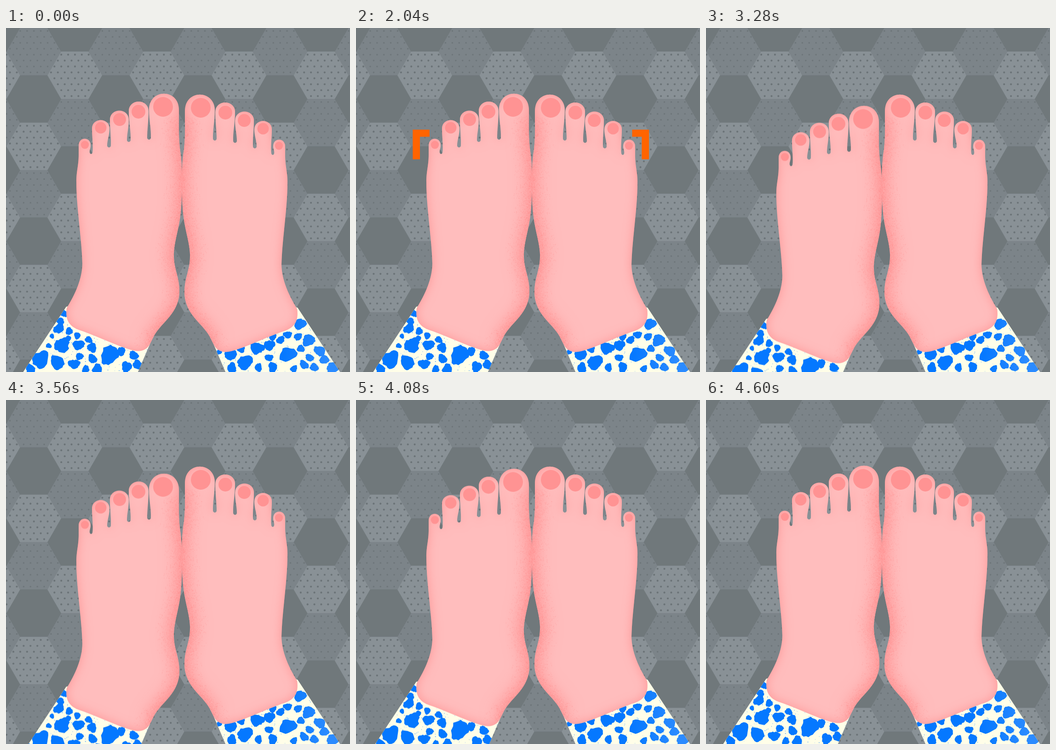
An HTML page with a canvas for the animation above (5 s loop, 748 px wide and 748 px high).

```html
<!DOCTYPE html>
<html lang="en">
<head>
<meta charset="utf-8">
<title>Tapping foot</title>
<style>
html, body { margin: 0; width: 100%; height: 100%; overflow: hidden; background: #70787b; }
canvas { display: block; width: 100vw; height: 100vh; }
</style>
</head>
<body>
<canvas id="stage" width="748" height="748"></canvas>
<script>
const SIZE = 748, LOOP = 5000, STEP = 40;
const MIRROR_X = 765, MIRROR_Y = 2;
const ctx = document.getElementById('stage').getContext('2d');

function layer(draw) {
  const canvas = document.createElement('canvas');
  canvas.width = canvas.height = SIZE;
  draw(canvas.getContext('2d'));
  return canvas;
}

function seeded(seed) {
  return () => {
    seed = (seed * 1664525 + 1013904223) >>> 0;
    return seed / 4294967296;
  };
}

function dot(c, x, y, r) {
  c.beginPath();
  c.arc(x, y, r, 0, Math.PI * 2);
  c.fill();
}

// ---- floor ----
const HEX = 59.5, HEX_H = HEX * Math.sqrt(3);
const TILES = [
  { fill: '#7c8489', dots: '#6e767a', r: 1.8 },
  { fill: '#70787b' },
  { fill: '#899196', dots: '#6b7377', r: 2.1 }
];

function hexagon(c, cx, cy, tile) {
  c.save();
  c.beginPath();
  for (let i = 0; i < 6; i++) {
    const a = i * Math.PI / 3;
    c.lineTo(cx + HEX * Math.cos(a), cy + HEX * Math.sin(a));
  }
  c.closePath();
  c.fillStyle = c.strokeStyle = tile.fill;
  c.lineWidth = 0.6;
  c.fill();
  c.stroke();
  if (tile.dots) {
    c.clip();
    c.fillStyle = tile.dots;
    const gap = HEX / 4, row = HEX_H / 8;
    for (let j = -4; j < 4; j++)
      for (let i = -5; i <= 5; i++)
        dot(c, cx + (i + (j & 1) / 2) * gap, cy + (j + 0.5) * row, tile.r);
  }
  c.restore();
}

const floor = layer(c => {
  for (let col = -1; col < 9; col++) {
    const odd = col & 1;
    for (let row = -1; row < 8; row++) {
      const y = 51.5 + (row + odd / 2) * HEX_H;
      hexagon(c, 60.7 + col * HEX * 1.5, y, TILES[(row + 3 + odd * 2) % 3]);
    }
  }
});

// ---- foot ----
const OUTER = 'M132 609C150 580 166 545 166 512C165 460 153 390 153 335C153 310 158 300 158 275L158 256';
const TOES = 'C158 236 184 236 184 255C184 262 181 266 182 271C183 275 187 275 188 271' +
  'C190 258 187 235 187 219C187 194 225 194 225 219C225 233 220 243 220 256C221 261 227 261 228 256' +
  'C229 240 226 220 226 200C226 173 267 173 267 200C267 215 263 230 263 244C264 249 270 249 271 244' +
  'C272 225 267 205 267 181C267 153 310 153 310 181C310 200 307 222 307 239C308 244 314 244 315 239' +
  'C316 222 311 200 311 178C311 131 376 131 376 178';
const INNER = 'C376 215 375 240 379 268C385 310 383 370 380 400C376 440 365 465 365 495' +
  'C365 525 377 540 377 572C377 620 338 640 322 669L313 687';
const CUFF = 'C307 699 295 704 282 702C255 698 200 670 160 657C140 650 128 637 132 609Z';
const NAILS = [[341.5, 171.5, 21.5], [288, 182, 15], [247, 199, 14], [206, 217, 12.5], [171.5, 254, 8.7]];

const footPath = new Path2D(OUTER + TOES + INNER + CUFF);

// Paints only the blurred shadow of a shape.
function glow(c, color, blur, paint) {
  c.save();
  c.shadowColor = color;
  c.shadowBlur = blur;
  c.shadowOffsetX = 2000;
  c.translate(-2000, 0);
  paint();
  c.restore();
}

function grain(c, d, count, depth, rnd) {
  const curve = document.createElementNS('http://www.w3.org/2000/svg', 'path');
  curve.setAttribute('d', d);
  const length = curve.getTotalLength();
  for (let i = 0; i < count; i++) {
    const p = curve.getPointAtLength(rnd() * length);
    c.fillStyle = rnd() < 0.7 ? 'rgba(255,130,130,.28)' : 'rgba(255,195,195,.3)';
    c.fillRect(p.x - rnd() * rnd() * depth, p.y + rnd() * 4, 1.3, 1.3);
  }
}

const foot = layer(c => {
  c.fillStyle = '#ffbdbd';
  c.fill(footPath);
  c.save();
  c.clip(footPath);
  const outside = new Path2D();
  outside.rect(-100, -100, 948, 948);
  outside.addPath(footPath);
  glow(c, 'rgba(255,138,138,.75)', 22, () => c.fill(outside, 'evenodd'));
  const side = 'M376 190' + INNER;
  const sidePath = new Path2D(side);
  glow(c, 'rgba(255,138,138,.6)', 32, () => {
    c.lineWidth = 30;
    c.stroke(sidePath);
  });
  grain(c, side, 2600, 42, seeded(7));
  c.restore();
  NAILS.forEach(([x, y, r]) => {
    c.fillStyle = '#ff9393';
    dot(c, x, y, r);
  });
});

// ---- trousers ----
const legPath = new Path2D('M131 606L36 750H286L313 687L282 650L160 600Z');

// x, y, radius
const LEFT_SPOTS = [
  126, 621, 8, 118, 637, 8, 115, 653, 12, 100, 670, 5, 137, 659, 8, 136, 675, 6,
  122, 690, 16, 93, 691, 6, 75, 721, 18, 53, 741, 10, 158, 689, 12, 155, 669, 7,
  180, 678, 8, 187, 695, 10, 111, 727, 15, 160, 714, 8, 148, 731, 12, 188, 719, 10,
  173, 742, 8, 198, 742, 11, 225, 711, 20, 251, 703, 9, 278, 712, 10, 262, 737, 11,
  286, 732, 10
];
const RIGHT_SPOTS = [
  488, 709, 13, 511, 698, 8, 546, 696, 14, 520, 727, 17, 491, 739, 11, 573, 690, 11,
  580, 672, 8, 613, 710, 18, 597, 678, 9, 612, 667, 9, 640, 644, 13, 635, 671, 9,
  658, 679, 13, 641, 697, 8, 682, 702, 12, 660, 717, 9, 648, 732, 10, 692, 721, 10,
  670, 738, 9, 710, 739, 12, 572, 717, 9, 580, 738, 11, 549, 738, 9, 626, 741, 8,
  464, 703, 7
];

function spot(c, x, y, r, rnd) {
  const points = 24, tilt = rnd() * Math.PI, squash = 0.8 + rnd() * 0.2;
  const phase = rnd() * 6;
  c.beginPath();
  for (let i = 0; i < points; i++) {
    const a = i / points * Math.PI * 2;
    const d = r * (1 + 0.1 * Math.sin(3 * a + phase) + 0.2 * (rnd() - 0.5));
    const u = d * Math.cos(a) * 1.08, v = d * Math.sin(a) * squash;
    c.lineTo(x + u * Math.cos(tilt) - v * Math.sin(tilt), y + u * Math.sin(tilt) + v * Math.cos(tilt));
  }
  c.closePath();
  c.fill();
}

function mirror(c) {
  c.translate(MIRROR_X, MIRROR_Y);
  c.scale(-1, 1);
}

function leg(spots, flipped, seed) {
  return layer(c => {
    const rnd = seeded(seed);
    c.save();
    if (flipped) mirror(c);
    c.clip(legPath);
    c.setTransform(1, 0, 0, 1, 0, 0);
    c.fillStyle = '#fffee8';
    c.fillRect(0, 0, SIZE, SIZE);
    const blue = c.createLinearGradient(600, 0, 700, 0);
    blue.addColorStop(0, '#0578ff');
    blue.addColorStop(1, '#2b8bff');
    c.fillStyle = blue;
    for (let i = 0; i < spots.length; i += 3)
      spot(c, spots[i], spots[i + 1], spots[i + 2], rnd);
    const left = flipped ? 450 : 35;
    for (let i = 0; i < 260; i++)
      dot(c, left + rnd() * 280, 605 + rnd() * 143, 0.3 + rnd() * 0.5);
    c.restore();
    if (flipped) mirror(c);
    c.drawImage(foot, 0, 0);
  });
}

const leftLeg = leg(LEFT_SPOTS, false, 11);
const rightLeg = leg(RIGHT_SPOTS, true, 29);

// ---- motion ----
const TAPS = [[3080, 0], [3440, 45], [3640, 2.7], [3840, 45], [4040, 2.7], [4240, 45], [4600, 0]];

const ease = p => (1 - Math.cos(Math.PI * Math.min(1, Math.max(0, p)))) / 2;

function footDrop(t) {
  for (let i = 1; i < TAPS.length; i++) {
    const [t0, a] = TAPS[i - 1], [t1, b] = TAPS[i];
    if (t >= t0 && t < t1) return a + (b - a) * ease((t - t0) / (t1 - t0));
  }
  return 0;
}

// Each bracket grows up from its foot, then turns inward.
function bracket(x, dir, amount) {
  const bottom = 285.5, top = 228.7, arm = 29;
  const rise = bottom - top, drawn = amount * (rise + arm);
  if (drawn < 0.1) return;
  ctx.beginPath();
  ctx.moveTo(x, bottom);
  ctx.lineTo(x, bottom - Math.min(drawn, rise));
  if (drawn > rise) ctx.lineTo(x + dir * (drawn - rise), top);
  ctx.stroke();
}

function render(t) {
  ctx.drawImage(floor, 0, 0);
  ctx.drawImage(rightLeg, 0, 0);
  ctx.drawImage(leftLeg, 0, footDrop(t));
  const amount = ease(t / 1040) - ease((t - 2000) / 1040);
  ctx.strokeStyle = '#ff6400';
  ctx.lineWidth = 15.6;
  bracket(131.2, 1, amount);
  bracket(629.2, -1, amount);
}

const start = performance.now();
function tick() {
  const t = (performance.now() - start) % LOOP;
  render(Math.floor(t / STEP) * STEP);
  requestAnimationFrame(tick);
}
tick();
</script>
</body>
</html>
```
